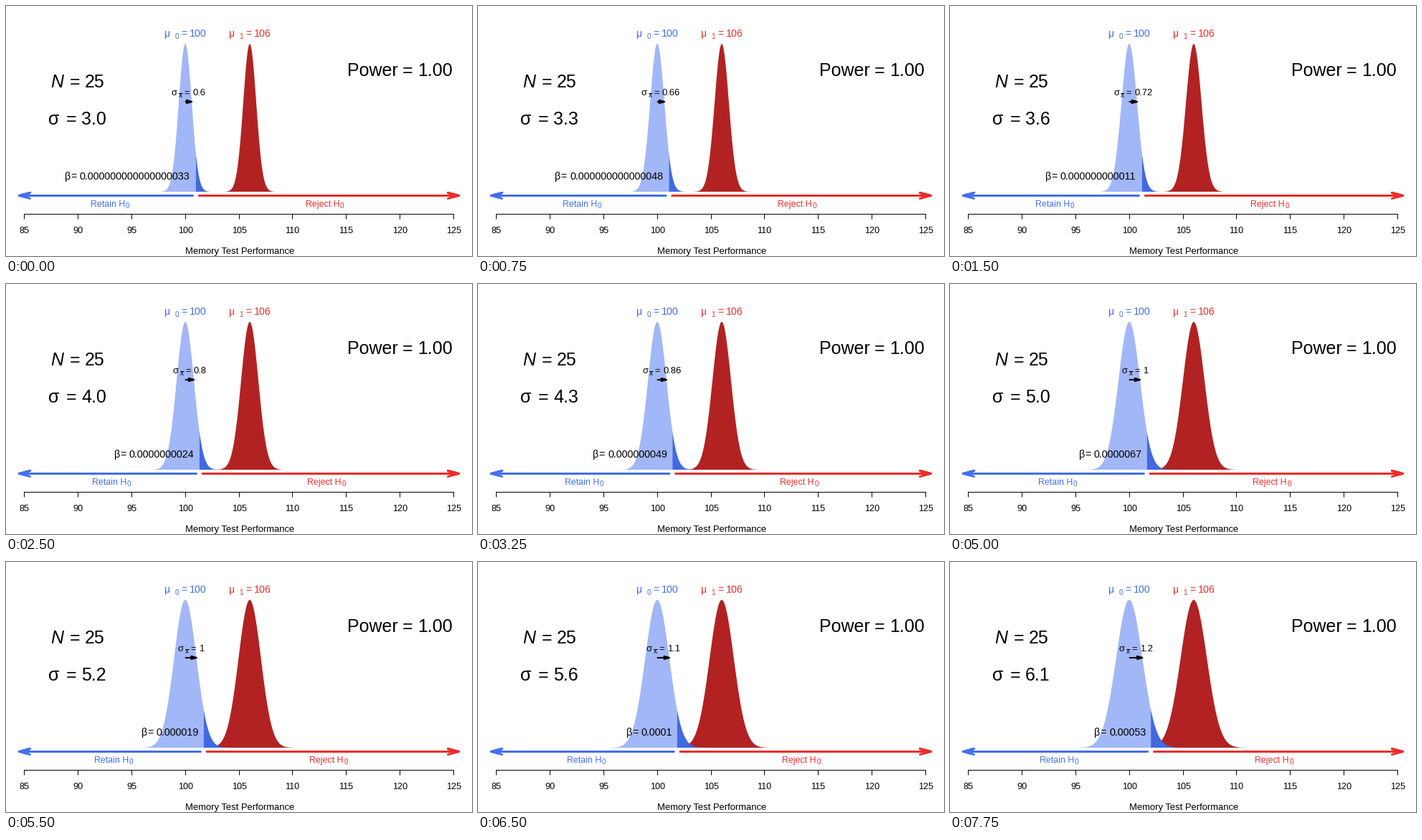
Recreate the animation shown at these times as a matplotlib script. Size 650 by 350 pixels, loop 8 s.

```python
import math

import matplotlib.pyplot as plt
import numpy as np
from matplotlib.animation import FuncAnimation
from matplotlib.patches import Polygon

W, H, DPI = 650, 350, 100
FRAMES, INTERVAL = 32, 250
BLUE, RED = "#436eee", "#ee2c2c"
LIGHT_BLUE, DARK_BLUE, DARK_RED = "#a2b7f7", "#4169e1", "#b22222"
MU0, MU1, N = 100, 106, 25
Z_CRIT = 1.6449
BASE, PEAK = 260, 53.0
AXIS_Y, ARROW_Y, SE_Y = 290.9, 265.5, 134.1

plt.rcParams["font.family"] = "Liberation Sans"
fig = plt.figure(figsize=(W / DPI, H / DPI), dpi=DPI, facecolor="white")
ax = fig.add_axes([0, 0, 1, 1])
ax.set_xlim(0, W)
ax.set_ylim(H, 0)
ax.axis("off")


def px(value):
    return 25.2 + (value - 85) * 14.99


def text(x, y, s, size, color="black", ha="left", **kw):
    return ax.text(x, y, s, fontsize=size * 72 / DPI, color=color,
                   ha=ha, va="baseline", **kw)


def stroke(width, color, zorder=4, cap="round"):
    line, = ax.plot([], [], color=color, lw=width * 72 / DPI, zorder=zorder,
                    solid_capstyle=cap, solid_joinstyle="round")
    return line


def set_arrow(line, start, tip, y, head, half):
    """Open-headed arrow drawn as one continuous stroke."""
    back = tip - math.copysign(head, tip - start)
    line.set_data([start, tip, back, tip, back],
                  [y, y, y - half, y, y + half])


def bell(mean, se, lo, hi):
    z = np.linspace(lo, hi, 160)
    y = BASE - (BASE - PEAK) * np.exp(-z * z / 2)
    x = px(mean + z * se)
    return np.vstack([[x[0], BASE], np.column_stack([x, y]), [x[-1], BASE]])


def region(color, zorder):
    return ax.add_patch(Polygon([[0, 0], [1, 0], [1, 1]], fc=color, ec="none",
                                lw=0, zorder=zorder))


def two_digits(p):
    """Two significant digits in plain decimal notation."""
    places = 1 - math.floor(math.log10(p))
    return f"{p:.{places}f}".rstrip("0")


def number_width(s, size):
    return sum(0.278 if c == "." else 0.556 for c in s) * size


# Axis, on whole pixels
ticks = {v: math.floor(px(v)) for v in range(85, 126, 5)}
stroke(1, "black", cap="projecting").set_data([ticks[85], ticks[125]],
                                              [AXIS_Y, AXIS_Y])
for v, x in ticks.items():
    stroke(1, "black", cap="butt").set_data([x, x], [AXIS_Y, 298])
    text(x + 0.5, 318, str(v), 12.6, ha="center")
text(325.8, 347, "Memory Test Performance", 13, ha="center")

# Fixed labels
for x, sub, mean, color in [(221.2, "0", MU0, BLUE), (311.2, "1", MU1, RED)]:
    text(x, 43, "μ", 14, color)
    text(x + 14.2, 46, sub, 10, color)
    text(x + 22.7, 43, "=", 14, color)
    text(x + 34.3, 43, str(mean), 14.3, color)
text(475.6, 98.3, "Power", 25)
text(553.2, 98.3, "=", 25)
text(574.2, 98.3, "1.00", 25)
text(62.3, 114.5, "N", 25, style="italic")
text(88.8, 114.5, "=", 25)
text(110, 114.5, str(N), 25)
text(59.5, 166.5, "σ", 25)
text(83.8, 166.5, "=", 25)
sigma_text = text(105.2, 166.5, "", 25)

# Curves
red_bell = region(DARK_RED, 1)
retain_area = region(LIGHT_BLUE, 2)
alpha_area = region(DARK_BLUE, 3)

# Decision arrows with their captions
retain_arrow, reject_arrow = stroke(3, BLUE), stroke(3, RED)
captions = []
for word, color in [("Retain H", BLUE), ("Reject H", RED)]:
    captions.append((text(0, 281, word, 12.4, color),
                     text(0, 283, "0", 10, color)))

# Standard error
se_arrow = stroke(2, "black")
se_bar = stroke(1, "black", cap="butt")
se_parts = [
    (text(0, 125, "σ", 13), -1.2),
    (text(0, 128, "x", 10), 8.9),
    (text(0, 125, "=", 13), 16.4),
]
se_number = text(0, 125, "", 13)

# Type II error
beta_parts = [(text(0, 243, "β", 14.3, zorder=6), -20.8),
              (text(0, 243, "=", 14.3, zorder=6), -12.8)]
beta_number = text(0, 243, "", 14.45, zorder=6)


def update(i):
    sigma = 3 + i / 10
    se = sigma / math.sqrt(N)
    crit = px(MU0 + Z_CRIT * se)
    sigma_text.set_text(f"{sigma:.1f}")

    red_bell.set_xy(bell(MU1, se, -4, 4))
    retain_area.set_xy(bell(MU0, se, -4, Z_CRIT))
    alpha_area.set_xy(bell(MU0, se, Z_CRIT, 4))

    set_arrow(retain_arrow, crit - 4.3, 18.5, ARROW_Y, 15, 4)
    set_arrow(reject_arrow, crit + 4.3, 631.5, ARROW_Y, 15, 4)
    for (word, sub), edge in zip(captions, (px(85), px(125))):
        left = (crit + edge) / 2 - 27.3
        word.set_x(left)
        sub.set_x(left + 48.5)

    tip = px(MU0 + se)
    set_arrow(se_arrow, px(MU0) + 0.5, tip, SE_Y, 7.3, 2)
    s = f"{se:.2g}"
    left = (px(MU0) + tip) / 2 + 0.6 - (28 + number_width(s, 13)) / 2
    for part, dx in se_parts:
        part.set_x(left + dx)
    se_bar.set_data([left + 8.9, left + 14], [122, 122])
    se_number.set_text(s)
    se_number.set_x(left + 28)

    z = Z_CRIT - (MU1 - MU0) / se
    s = two_digits(math.erfc(-z / math.sqrt(2)) / 2)
    left = crit - 6 - number_width(s, 14.4)
    beta_number.set_text(s)
    beta_number.set_x(left)
    for part, dx in beta_parts:
        part.set_x(left + dx)
    return []


anim = FuncAnimation(fig, update, frames=FRAMES, interval=INTERVAL,
                     repeat=True, repeat_delay=0, blit=False)
plt.show()
```
